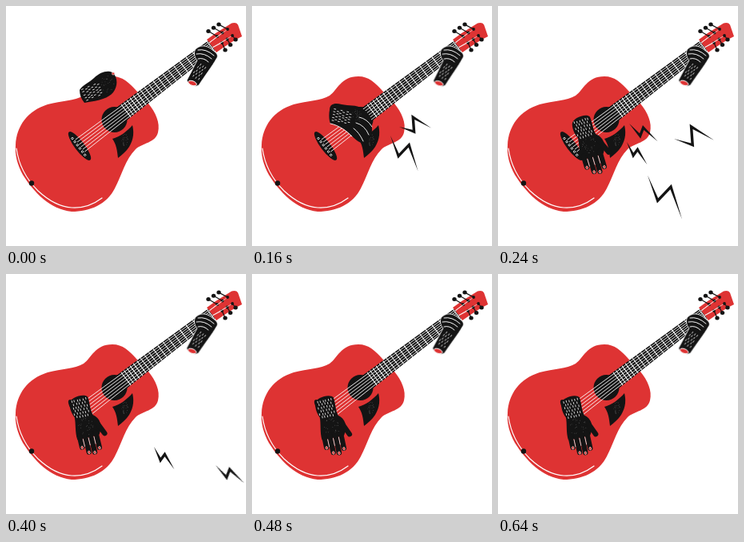
An HTML page that plays this animation: 300x300 px, repeating every 720 ms.

```html
<!DOCTYPE html>
<html lang="en">
<head>
<meta charset="utf-8">
<title>Strumming guitar</title>
<style>
  html, body { margin: 0; width: 100%; height: 100%; overflow: hidden; background: #fff; }
  svg { display: block; width: 100vw; height: 100vh; }
  .ink { fill: #141414; }
  .red { fill: #de3333; }
  .line { fill: none; stroke: #fff; stroke-linecap: round; }
  .limb { fill: none; stroke: #141414; stroke-linecap: round; }
  .nail { fill: #de3333; stroke: #f3c4bf; stroke-width: .7; }
  /* each pose holds for one ninth of the loop */
  .pose { visibility: hidden; animation: hold 720ms step-end infinite; animation-delay: calc(var(--i) * 80ms - 720ms); }
  .grip { transform-origin: 250px 60px; animation: grip 720ms step-end infinite; }
  @keyframes hold { 0% { visibility: visible; } 11.111%, 100% { visibility: hidden; } }
  @keyframes grip {
    0% { transform: none; }
    22.222% { transform: rotate(-1deg); }
    33.333% { transform: rotate(.6deg); }
  }
</style>
</head>
<body>
<svg viewBox="0 0 300 300" preserveAspectRatio="none">
  <!-- body -->
  <path class="red" d="M12 174 C13 150 27 131 52 123 C70 118 85 119 97 112 C107 105 111 88 133 88
    C146 88 154 96 163 106 L178 122 C187 133 193 146 190 158 C187 171 171 171 162 179
    C149 192 145 211 136 228 C126 248 105 257 82 257 C55 254 35 233 21 211 C14 198 11 186 12 174Z"/>
  <path class="line" stroke-width="1.2" d="M13 178 C16 200 26 217 40 231 C54 244 68 251 82 252 C96 253 108 249 120 240"/>
  <circle class="ink" cx="32" cy="221.500" r="3.200"/>
  <path class="ink" d="M158 149 C160 157 160 166 154 176 C150 182 145 186 140 190 C139 181 138 173 133 166 C143 163 151 157 158 149Z"/>
  <circle class="ink" cx="135.500" cy="142" r="16"/>
  <!-- head -->
  <path class="red" d="M251 42 L262 34 L282 21.500 Q288 20 290 23.500 L295 38 Q284 43 263 58Z"/>
  <g id="pegs"></g>
  <!-- neck and strings -->
  <g transform="translate(92 175) rotate(-37.2)">
    <path class="ink" d="M63 -10.500 L207 -7.500 V7.500 L63 10Z"/>
    <ellipse class="ink" rx="6" ry="22"/>
    <g id="neck"></g>
  </g>
  <!-- fretting hand -->
  <g class="grip">
    <path class="ink" stroke="#fff" stroke-width=".8" d="M226 93 L239 68 C235 64 234 56 238 53 C245 47 254 51 258 55
      C264 59 266 62 263 66 C258 75 248 88 241 99 C236 102 228 99 226 93Z"/>
    <ellipse class="red" cx="233" cy="96.500" rx="5.500" ry="2.800" transform="rotate(20 233 96.500)" stroke="#fff" stroke-width=".9"/>
    <path class="line" stroke-width="1" d="M240 55 Q250 53 260 62 M238 60 Q248 58 257 66 M240 66 Q247 64 253 70"/>
    <g id="gripHair"></g>
  </g>
  <g id="strum"></g>
  <g id="bolts"></g>
</svg>
<script>
  const NS = "http://www.w3.org/2000/svg";
  const $ = id => document.getElementById(id);

  function add(parent, tag, attrs) {
    const el = document.createElementNS(NS, tag);
    for (const k in attrs) el.setAttribute(k, attrs[k]);
    parent.appendChild(el);
    return el;
  }
  const line = (parent, cls, width, d) => add(parent, "path", { class: cls, "stroke-width": width, d });
  const pose = (parent, i, transform = "") => add(parent, "g", { class: "pose", style: `--i:${i}`, transform });

  let seed = 7;
  const rand = () => (seed = seed * 16807 % 2147483647) / 2147483647;

  // staggered short strokes filling a width x length patch, turned to the limb
  function hairs(parent, x, y, angle, width, length) {
    const g = add(parent, "g", { transform: `translate(${x} ${y}) rotate(${angle})` });
    let d = "";
    for (let row = 0; row * 4 < length; row++)
      for (let u = -width / 2 + row % 2 * 1.8; u <= width / 2; u += 3.6)
        d += `M${u + rand() - .5} ${row * 4 + rand()}v2`;
    line(g, "line", .75, d);
  }

  // faint grain
  function grain(parent, x, y, rx, ry) {
    for (let i = 0; i < 26; i++) {
      const a = rand() * 2 * Math.PI, r = Math.sqrt(rand());
      add(parent, "circle", { cx: x + rx * r * Math.cos(a), cy: y + ry * r * Math.sin(a), r: .35, fill: "#777" });
    }
  }

  // frets, strings and bridge pins in neck coordinates
  const neck = $("neck");
  for (let n = 0; n < 19; n++) {
    const x = 206 / 2 ** (n / 12), h = 10.8 - x * .016;
    line(neck, "line", 1, `M${x} ${-h}V${h}`);
  }
  for (let i = -2.5; i <= 2.5; i++) {
    line(neck, "line", .8, `M1 ${i * 3.8}L206 ${i * 2.3}`);
    add(neck, "circle", { class: "ink", cx: -1.5, cy: i * 5.2, r: 1.2, stroke: "#fff", "stroke-width": .8 });
  }

  // three tuners along one side: knob, shaft, post and its string
  function tuners(knobX, knobY, drop, postX, postY, nut) {
    for (let i = 0; i < 3; i++) {
      const x = knobX + i * 6.5, y = knobY - i * drop;
      const px = postX + i * 6.5, py = postY - i * 4.5;
      line($("pegs"), "line", .6, `M${nut}L${px} ${py}`);
      line($("pegs"), "limb", 1.2, `M${x} ${y}L${px} ${py}`);
      add($("pegs"), "ellipse", { class: "ink", cx: x, cy: y, rx: 2.7, ry: 2.5 });
      add($("pegs"), "circle", { class: "ink", cx: px, cy: py, r: 1.9 });
    }
  }
  tuners(253, 31.5, 4.2, 264, 38, "254 46");
  tuners(274, 55, 6.5, 270, 46, "258 52");

  hairs($("gripHair"), 236, 90, 213, 9, 17);
  grain($("strum"), 149, 169, 5, 9);

  function fist(i) {
    const g = pose($("strum"), i);
    add(g, "path", { class: "ink", d: "M92 105 C95 99 104 96 110 90 C118 82 127 80 133 83 C140 89 140 100 134 108 C128 115 118 118 98 121 C94 116 92 111 92 105Z" });
    add(g, "circle", { class: "nail", cx: 134, cy: 84.5, r: 1.6 });
    hairs(g, 97, 111, -112, 15, 22);
    grain(g, 126, 98, 9, 11);
  }

  function sweep(i, transform) {
    const g = pose($("strum"), i, transform);
    add(g, "path", { class: "ink", d: "M97 130 C97 122 104 121 112 123 C121 125 130 123 138 128 C145 133 150 140 150 148 L150 156 C148 163 147 170 140 171 C133 172 128 165 122 160 C115 153 107 149 98 147 C96 142 96 135 97 130Z" });
    line(g, "line", .9, "M98 147 C108 149 117 155 125 163 M134 139 Q144 141 150 151 M130 146 Q141 149 146 161 M127 153 Q134 158 139 169");
    hairs(g, 101, 135, -78, 16, 22);
    grain(g, 130, 138, 7, 9);
  }

  // open hand hanging from the forearm's cut end at (x, y)
  function openHand(i, x, y, angle) {
    const g = pose($("strum"), i, `translate(${x} ${y}) rotate(${angle})`);
    add(g, "path", { class: "ink", d: "M-12 6 C-10 -2 9 -3 12 3 C13 12 11 18 13 26 C21 32 22 42 15 52 L-13 52 C-14 42 -10 32 -10 24 C-13 17 -13 11 -12 6Z" });
    line(g, "limb", 6.4, "M14 33L22 52");
    for (let f = 0; f < 4; f++) {
      const fx = -9.5 + f * 7, tip = 72 - 3 * (f - 1.8) ** 2;
      line(g, "limb", 6.4, `M${fx} 48V${tip}`);
      add(g, "ellipse", { class: "nail", cx: fx, cy: tip + .5, rx: 1.3, ry: 1.8 });
      if (f) line(g, "line", .7, `M${fx - 3.5} 53v9`);
    }
    hairs(g, 0, 3, 0, 18, 22);
    grain(g, 2, 38, 11, 11);
  }

  fist(0);
  sweep(1, "translate(-2 -14) rotate(-10 115 140)");
  sweep(2);
  // the follow-through settles with a damped swing
  for (let i = 3; i < 9; i++) {
    const t = i - 3, drop = .15 ** t;
    openHand(i, 89.5 + 13 * drop, 154 - 15 * drop, -12.5 - 4 * Math.cos(Math.PI * t) * .5 ** t);
  }

  // offset that gives a bent stroke the half-width w at its corner q
  function miter(p, q, r, w) {
    const normal = (a, b) => {
      const dx = b[0] - a[0], dy = b[1] - a[1], len = Math.hypot(dx, dy);
      return [-dy / len, dx / len];
    };
    const m = normal(p, q), n = normal(q, r);
    const k = w / (1 + m[0] * n[0] + m[1] * n[1]);
    return [(m[0] + n[0]) * k, (m[1] + n[1]) * k];
  }

  // zigzag with sharp ends; kick sets how far the second bend stands out
  function bolt(g, x, y, length, angle, kick) {
    const pts = [[0, 0], [.47, .14], [.42, -kick], [1, 0]].map(p => p.map(v => v * length));
    const [a, b, c, d] = pts;
    const m = miter(a, b, c, 1.7), n = miter(b, c, d, 1.7);
    const shift = (p, o, s) => [p[0] + o[0] * s, p[1] + o[1] * s];
    add(g, "polygon", {
      class: "ink",
      points: [a, shift(b, m, 1), shift(c, n, 1), d, shift(c, n, -1), shift(b, m, -1)].join(" "),
      transform: `translate(${x} ${y}) rotate(${angle})`
    });
  }

  // a bolt flies straight for three steps, swelling midway
  function fly(born, x, y, dx, dy, length, angle, kick) {
    for (let t = 0; t < 3; t++) {
      const swell = 1 + .25 * Math.sin(t * Math.PI / 2);
      bolt(pose($("bolts"), born + t), x + dx * t, y + dy * t, length * swell, angle, kick);
    }
  }
  fly(2, 184, 151, 36, 15, 40, 2, .32);
  fly(2, 173, 162, 14, 49.5, 56, 52, .2);
  fly(3, 161, 170, 12, 23, 38, 48, .1);
  fly(3, 164, 147, 49, 46, 42, 32, .12);
</script>
</body>
</html>
```
